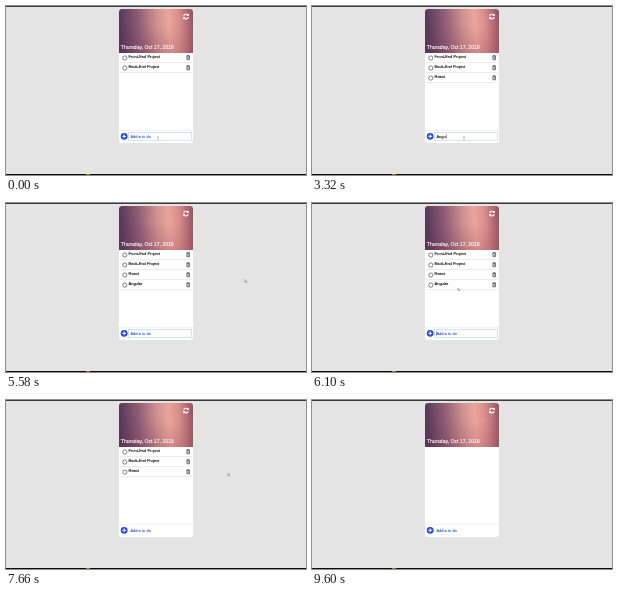
Write an HTML page that moves like this. It is 300 px wide and 169 px high and loops after 9.66 s.

```html
<!DOCTYPE html>
<html lang="en">
<head>
<meta charset="utf-8">
<title>To-do list</title>
<style>
  html, body { margin: 0; width: 100%; height: 100%; overflow: hidden; background: #e4e4e4; }
  svg { display: block; width: 100vw; height: 100vh; }
  text { font: 4px "Liberation Sans", Arial, sans-serif; white-space: pre; }
</style>
</head>
<body>
<svg viewBox="0 0 300 169">
  <defs>
    <linearGradient id="base" x1="0" y1="0.05" x2="1" y2="0">
      <stop offset="0" stop-color="#56385a"/>
      <stop offset="0.25" stop-color="#8e5c74"/>
      <stop offset="0.5" stop-color="#cf908f"/>
      <stop offset="0.66" stop-color="#eba59c"/>
      <stop offset="0.8" stop-color="#d98d8b"/>
      <stop offset="1" stop-color="#95505f"/>
    </linearGradient>
    <linearGradient id="shade" x1="0" y1="0" x2="0" y2="1">
      <stop offset="0.4" stop-color="#7a2a48" stop-opacity="0"/>
      <stop offset="1" stop-color="#7a2a48" stop-opacity="0.22"/>
    </linearGradient>
    <clipPath id="card"><rect x="113" y="3" width="74" height="134" rx="3"/></clipPath>
    <g id="trash" fill="none" stroke="#222" stroke-width="0.6">
      <path d="M-1.8 -1.6H1.8M-0.7 -1.7V-2.3H0.7V-1.7"/>
      <path d="M-1.3 -1.4V1.9H1.3V-1.4M0 -0.7V1.3"/>
    </g>
  </defs>

  <rect width="300" height="169" fill="#e4e4e4"/>
  <rect width="300" height="0.8" fill="#111"/>
  <rect y="168" width="300" height="1" fill="#0c0c0c"/>
  <rect x="80" y="168" width="4" height="1" fill="#8d7d2c"/>

  <g clip-path="url(#card)">
    <rect x="113" y="3" width="74" height="134" fill="#fff"/>
    <rect x="113" y="3" width="74" height="44" fill="url(#base)"/>
    <rect x="113" y="3" width="74" height="44" fill="url(#shade)"/>
  </g>
  <g transform="translate(180 10.6)" fill="none" stroke="#fff" stroke-width="1.1">
    <path d="M-2.3 -0.5A2.4 2.4 0 0 1 1.8 -1.6M2.3 0.5A2.4 2.4 0 0 1 -1.8 1.6"/>
    <path d="M2.8 -3V-0.5H0.3ZM-2.8 3V0.5H-0.3Z" fill="#fff" stroke="none"/>
  </g>
  <text x="114.8" y="43.4" fill="#fff" stroke="#fff" stroke-width="0.12" style="font-size:5.1px">Thursday, Oct 17, 2019</text>

  <g id="rows"></g>

  <path d="M113 124.3H187" stroke="#e6e6e6" stroke-width="0.6"/>
  <circle cx="118.2" cy="130.3" r="3.4" fill="#2042e4"/>
  <path d="M116.2 130.3H120.2M118.2 128.3V132.3" stroke="#fff" stroke-width="1"/>
  <rect id="focus" x="122.6" y="126.5" width="62.8" height="7.8" fill="none" stroke="#bcd6f5" stroke-width="0.7"/>
  <text id="entry" x="124.4" y="131.8" stroke-width="0.12"></text>
  <rect id="caret" y="128.3" width="0.5" height="4.2" fill="#444"/>

  <path id="arrow" d="M0 0V2.7L0.7 2.2L1.2 3.1L1.6 2.9L1.2 2H2Z" fill="#fff" stroke="#444" stroke-width="0.35"/>
  <path id="beam" d="M-0.5 -1.4H0.5M0 -1.4V1.4M-0.5 1.4H0.5" fill="none" stroke="#666" stroke-width="0.45"/>
</svg>
<script>
const LOOP = 9660, BLUR = 6420, BLINK = 245;
const $ = id => document.getElementById(id);

// Each word: key press times, then the time of Enter
const words = [
  { text: 'React', keys: [340, 740, 860, 1040, 1260], enter: 1720 },
  { text: 'Angular', keys: [2640, 2820, 3000, 3160, 3660, 3900, 3980], enter: 4140 }
];
const presses = words.flatMap(w => [...w.keys, w.enter]);

const items = [
  { text: 'Front-End Project', from: 0, done: LOOP, to: 9000 },
  { text: 'Back-End Project', from: 0, done: 8240, to: 9000 },
  { text: 'React', from: words[0].enter, done: LOOP, to: 9000 },
  { text: 'Angular', from: words[1].enter, done: BLUR, to: 7280 }
];

// Pointer stops: time, x, y
const path = [
  [0, 152, 131.7], [5140, 152, 131.7], [5580, 238.8, 76.5], [5700, 240, 78],
  [6100, 146, 85], [6240, 66, 87], [6400, 118, 82], [6460, 118, 82],
  [6600, 136.5, 90.5], [6960, 182, 82], [7280, 182, 82], [7560, 231, 74],
  [8140, 118, 62], [8250, 118, 62], [8400, 134.5, 66], [8560, 204, 2],
  [8740, 179, 14.5], [LOOP, 179, 14.5]
];

function pointer(t) {
  const i = path.findIndex(p => p[0] > t);
  const [t0, x0, y0] = path[i - 1], [t1, x1, y1] = path[i];
  const k = (t - t0) / (t1 - t0), e = k * k * (3 - 2 * k);
  return [x0 + (x1 - x0) * e, y0 + (y1 - y0) * e];
}

function row(item, i, t) {
  const y = 51.7 + i * 10.05, done = t >= item.done;
  const mark = done
    ? `<circle cx="118.8" cy="${y + 0.3}" r="2.4" fill="#4c9a1c"/>
       <path d="M117.5 ${y + 0.3}l1 1l1.7 -1.9" fill="none" stroke="#fff" stroke-width="0.7"/>`
    : `<circle cx="118.8" cy="${y + 0.3}" r="2.1" fill="#fff" stroke="#333" stroke-width="0.6"/>`;
  const look = done
    ? 'fill="#b4b4b4" text-decoration="line-through"'
    : 'fill="#111" stroke="#111" stroke-width="0.12"';
  return `${mark}<text x="122.5" y="${y + 0.5}" ${look}>${item.text}</text>
    <use href="#trash" x="182.2" y="${y + 0.1}"/>
    <path d="M114 ${y + 4.8}H186" stroke="#dedede" stroke-width="0.6"/>`;
}

const show = (id, on) => $(id).setAttribute('visibility', on ? 'visible' : 'hidden');
let lastRows = null;

function draw(t) {
  const html = items.filter(it => t >= it.from && t < it.to)
    .map((it, i) => row(it, i, t)).join('');
  if (html !== lastRows) $('rows').innerHTML = lastRows = html;

  const word = words.find(w => t >= w.keys[0] && t < w.enter);
  const typed = word ? word.text.slice(0, word.keys.filter(k => k <= t).length) : '';
  const entry = $('entry'), ink = typed ? '#222' : '#2f5be0';
  entry.textContent = typed || 'Add a to do';
  entry.setAttribute('fill', ink);
  entry.setAttribute('stroke', ink);

  const focused = t < BLUR;
  const last = presses.filter(k => k <= t).pop() ?? -BLINK;
  show('focus', focused);
  show('caret', focused && Math.floor((t - last) / BLINK) % 2 === 0);
  $('caret').setAttribute('x', 124.4 + (typed ? entry.getComputedTextLength() + 0.2 : -0.3));

  const [x, y] = pointer(t);
  const inField = x > 122 && x < 186 && y > 126 && y < 135;
  show('beam', inField);
  show('arrow', !inField);
  for (const id of ['beam', 'arrow']) $(id).setAttribute('transform', `translate(${x} ${y})`);
}

const start = performance.now();
function tick() {
  draw((performance.now() - start) % LOOP);
  requestAnimationFrame(tick);
}
tick();
</script>
</body>
</html>
```
